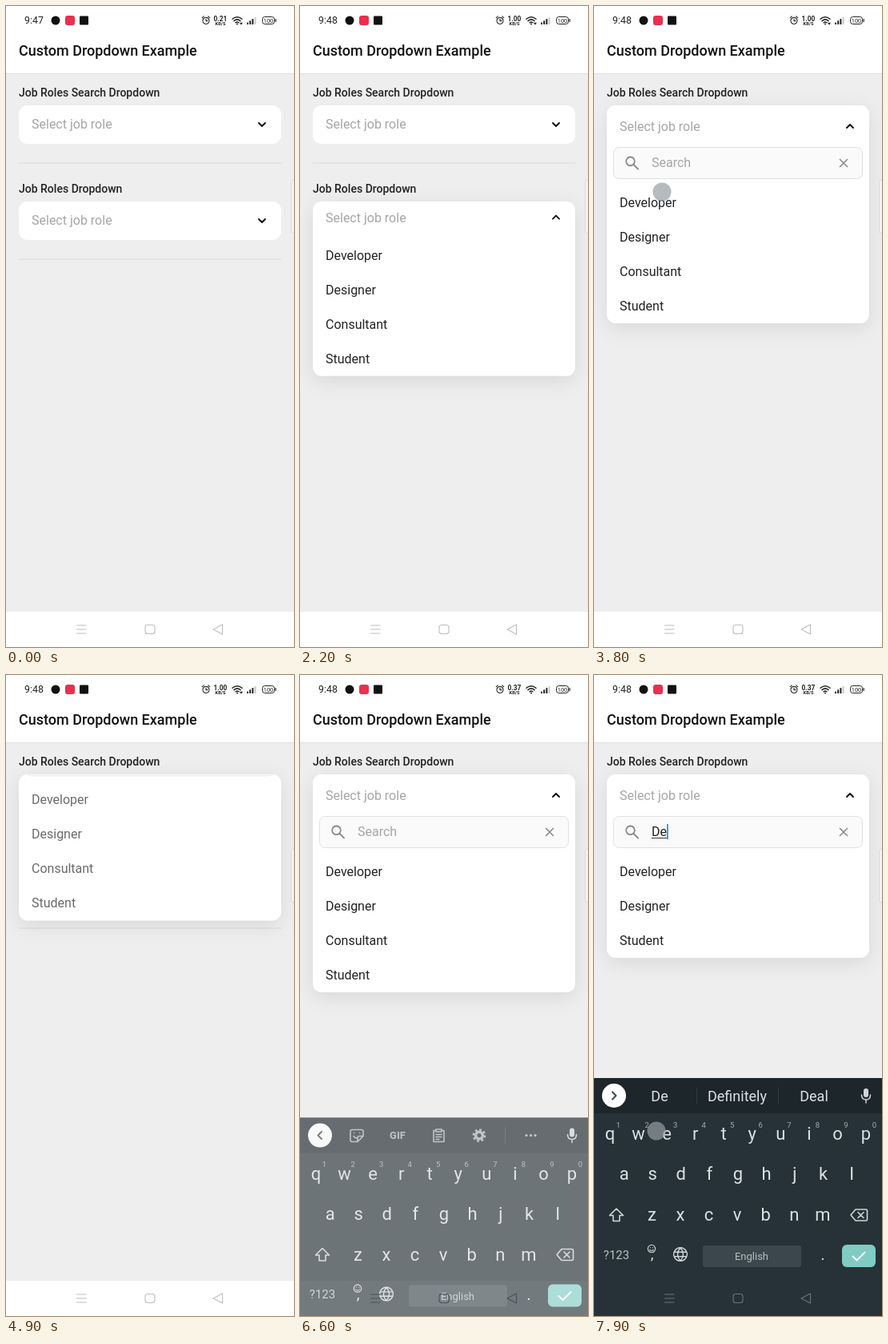
Write an HTML page that moves like this. It is 360x800 px and loops after 8 s.

```html
<!DOCTYPE html>
<html lang="en">
<head>
<meta charset="utf-8">
<title>Dropdown demo</title>
<style>
  html, body { margin: 0; width: 100%; height: 100%; overflow: hidden; background: #eee; }
  svg { display: block; }
  text { font-family: Roboto, "Noto Sans", sans-serif; font-size: 16px; fill: #222; white-space: pre; }
  .medium { font-weight: 500; font-size: 14px; }
  .hint { fill: #a6a6a6; }
  .line { fill: none; stroke-linecap: round; stroke-linejoin: round; }
  .mid { text-anchor: middle; }
  .panel { fill: #fff; filter: drop-shadow(0 6px 12px rgba(0, 0, 0, .09)); }
  #keyboard text { fill: #dce2e4; }
  #keyboard .letter { font-size: 22px; }
  #keyboard .digit { font-size: 9.5px; fill: #a3adb1; }
  #keyboard .word { font-size: 18px; }
  #tools { stroke: #aab0b3; stroke-width: 1.6; }
</style>
</head>
<body>
<svg id="stage" width="360" height="800" viewBox="0 0 360 800"></svg>
<script>
const LOOP = 8000;
const ROLES = ["Developer", "Designer", "Consultant", "Student"];
const $ = id => document.getElementById(id);
const clamp = v => Math.min(1, Math.max(0, v));
const show = (id, on) => { $(id).style.display = on ? "" : "none"; };

const text = (x, y, s, cls = "", more = "") => `<text x="${x}" y="${y}" class="${cls}" ${more}>${s}</text>`;
const line = (d, color, width, more = "") =>
  `<path class="line" d="${d}" stroke="${color}" stroke-width="${width}" ${more}/>`;
const rect = (x, y, w, h, r, fill, more = "") =>
  `<rect x="${x}" y="${y}" width="${w}" height="${h}" rx="${r}" fill="${fill}" ${more}/>`;
const chevron = (x, y, dir) => line(`M${x - 4} ${y - 2 * dir}l4 ${4 * dir}l4 ${-4 * dir}`, "#111", 1.9);

const field = (y, label) => text(16, y - 11, label, "medium")
  + rect(16, y, 328, 48, 11, "#fff") + text(32, y + 29, "Select job role", "hint")
  + chevron(320, y + 24, 1) + rect(16, y + 71.3, 328, 1.4, 0, "#e0e0e0");

const statusBar = text(23, 22.3, "9:47", "", 'id="clock" style="font-size:12.4px"')
  + `<circle cx="62" cy="18" r="5.5" fill="#111"/>`
  + rect(74, 12, 12, 12, 3, "#e9304f") + rect(92, 12.5, 11, 11, 1, "#111")
  + line("M250 14.3a4.1 4.1 0 1 1-.01 0M250 16v2.6h2M245.3 14.6l2-1.8M254.7 14.6l-2-1.8", "#222", 1.1)
  + text(268, 18.6, "0.21", "mid", 'id="rate" style="font-size:8.4px;font-weight:700"')
  + text(268, 24.2, "KB/S", "mid", 'style="font-size:5.7px;font-weight:700"')
  + line("M283 16.3q6-5.2 12 0M285 18.6q4-3.4 8 0M287.1 20.8q1.9-1.6 3.8 0", "#222", 1.5)
  + `<circle cx="289" cy="22.6" r="1" fill="#222"/><path id="traffic" d="M292 20.8h4l-2 3z" fill="#222"/>`
  + [0, 1, 2, 3].map(i => rect(301 + i * 3.2, 20.5 - i * 2.2, 2, 2.5 + i * 2.2, .6, i < 3 ? "#222" : "#c8c8c8")).join("")
  + rect(320.5, 13.5, 15, 9, 3, "none", 'stroke="#222"') + rect(336.5, 16, 1.2, 4, .6, "#222")
  + text(328, 20.7, "100", "mid", 'style="font-size:7.4px"');

// An overlay panel; its content hangs from the lower edge while it unfolds.
const overlay = (id, y) => rect(16, y, 328, 0, 11, "#fff", `id="${id}Box" class="panel"`)
  + `<svg id="${id}View" x="16" y="${y}" width="328" height="0"><g id="${id}Body"></g></svg>`;

const rows = (list, height) =>
  list.map((s, i) => text(16, height - 16 - 43 * (list.length - 1 - i), s)).join("");

const plainBody = text(16, 27, "Select job role", "hint") + chevron(304, 21, -1) + rows(ROLES, 219);

const searchBody = typed => {
  const list = ROLES.filter(s => s.toLowerCase().includes(typed.toLowerCase()));
  return text(16, 31.5, "Select job role", "hint") + chevron(304, 26, -1)
    + rect(8.5, 52.5, 311, 39, 7, "#fafafa", 'stroke="#e0e0e0"')
    + line("M29.5 64.5a5.3 5.3 0 1 1-.01 0M33.5 74l5.5 5.5", "#8a8a8a", 1.8)
    + line("M291.5 67.5l9 9m0-9l-9 9", "#8a8a8a", 1.6)
    + (typed ? text(56, 77, typed) + rect(56, 79, typed.length > 1 ? 19 : 10.5, 1, 0, "#333")
             : text(56, 77, "Search", "hint"))
    + rows(list, 100 + 43 * list.length);
};

const STEP = 35.55;
const letters = (s, x, y) => [...s].map((c, i) => text(x + i * STEP, y, c, "letter mid", `data-key="${c}"`)).join("");

const tools = `<g id="tools" class="line">
    <path d="M79 526v-6q0-2-2-2h-12q-2 0-2 2v11q0 2 2 2h7l7-7h-5q-2 0-2 2v5M67.5 522h.1M74.5 522h.1M67 526q2 3 4 2"/>
    <path d="M170 519h-3v14h13v-14h-3M170 517.5h7v3h-7zM170 524h7M170 527h7M170 530h4"/>
    <circle cx="224" cy="525" r="4.4" stroke-width="3.6"/>
    <circle cx="224" cy="525" r="7.2" stroke-width="2.4" stroke-dasharray="2.8 2.85" stroke-linecap="butt"/>
    <path d="M256.500 515v20" stroke="#38434a" stroke-width="1"/>
    <path d="M283 525h.1M288.500 525h.1M294 525h.1" stroke-width="3.200"/></g>`
  + text(122, 529.5, "GIF", "mid", 'style="font-size:13px;font-weight:700;fill:#aab0b3"');

const keyboard = `<g id="keyboard">`
  + rect(0, 503, 360, 300, 0, "#263238") + rect(0, 503, 360, 44, 0, "#1d262b")
  + `<g id="toolRow">${tools}</g><g id="wordRow">`
  + [82, 179, 275].map(x => text(x, 532, "", "word mid")).join("")
  + line("M128.500 515v20M230.500 515v20", "#2f3a40", 1) + `</g>`
  + `<circle cx="25" cy="525" r="15" fill="#fff"/>`
  + line("M27 520.500l-4.500 4.500l4.500 4.500", "#37474f", 2, 'id="arrow"')
  + rect(337, 516, 6, 11, 3, "#cfd5d8") + line("M334.500 524q0 6 5.500 6t5.500-6M340 530v4", "#cfd5d8", 1.5)
  + letters("qwertyuiop", 20, 580) + letters("asdfghjkl", 37.7, 630) + letters("zxcvbnm", 72.5, 681)
  + [..."1234567890"].map((c, i) => text(30.5 + i * STEP, 564.5, c, "digit mid")).join("")
  + line("M28 666l-8.500 8.500h4.500v7h8v-7h4.500z", "#cfd5d8", 1.6)
  + line("M327 667h13q1.500 0 1.500 1.500v11q0 1.500-1.500 1.500h-13l-6-7zM330 670.500l7 7m0-7l-7 7", "#cfd5d8", 1.6)
  + text(28, 728.5, "?123", "mid", 'style="font-size:15px;fill:#b9c2c5"')
  + line("M72 711.300a4.700 4.700 0 1 1-.01 0M70.300 714.600h.1M73.700 714.600h.1M69.700 717.200q2.300 3 4.600 0", "#cfd5d8", 1.1)
  + text(72.5, 729, ",", "mid", 'style="font-size:19px"')
  + line("M108 714.700a8.300 8.300 0 1 1-.01 0q-7 8.300 0 16.600q7-8.300 0-16.600M100.500 720.300h15M100.500 725.700h15", "#cfd5d8", 1.4)
  + rect(136, 712, 123, 27, 3, "#3b474d")
  + text(197, 730, "English", "mid", 'style="font-size:13px;fill:#b5bec1"')
  + text(286, 730, ".", "mid", 'style="font-size:21px"')
  + rect(310, 711, 42, 28, 6, "#80cbc4") + line("M323.500 725.500l5 5l10-10", "#fff", 2)
  + `</g>`;

$("stage").innerHTML = rect(0, 0, 360, 800, 0, "#eee") + rect(0, 0, 360, 84, 0, "#fff")
  + rect(0, 84, 360, 1, 0, "#dfdfdf") + rect(0, 756, 360, 44, 0, "#fff")
  + statusBar + text(16, 62.3, "Custom Dropdown Example", "medium", 'style="font-size:18px;fill:#111"')
  + field(124, "Job Roles Search Dropdown") + field(244, "Job Roles Dropdown")
  + overlay("plain", 244) + overlay("search", 124)
  + rect(72, 186, 1.8, 19, 0, "#2196f3", 'id="cursor"')
  + rect(356.5, 217.5, 9, 66, 2, "#f2f2f2", 'stroke="#dadada"')
  + keyboard
  + line("M88.500 773h11.500M88.500 778h11.500M88.500 783h11.500M177 772.500h6q3 0 3 3v5q0 3-3 3h-6q-3 0-3-3v-5q0-3 3-3M259 778l11.500-6v12z", "#bbb", 1.1, 'id="nav"')
  + `<circle id="touch" r="11.500" fill="#969ea2" opacity=".7"/>`;

$("plainBody").innerHTML = plainBody;
const keys = [...document.querySelectorAll("[data-key]")];
const words = [...document.querySelectorAll(".word")];

// Cubic ease (.4, 0, .2, 1).
function ease(x) {
  let lo = 0, hi = 1;
  for (let i = 0; i < 24; i++) {
    const s = (lo + hi) / 2, r = 1 - s;
    if (1.2 * r * r * s + .6 * r * s * s + s * s * s < x) lo = s; else hi = s;
  }
  return lo * lo * (3 - 2 * lo);
}

// Unfolded share for a list of [open, close] times.
const unfolded = (t, spans) => Math.max(...spans.map(([open, close]) =>
  t <= open || t >= close + 200 ? 0 : ease(Math.min(clamp((t - open) / 200), clamp(1 - (t - close) / 200)))));

function setOverlay(id, full, share) {
  const h = full * share;
  show(id + "Box", share > 0);
  show(id + "View", share > 0);
  $(id + "Box").setAttribute("height", h);
  $(id + "View").setAttribute("height", h);
  $(id + "Body").setAttribute("transform", `translate(0 ${h - full})`);
  $(id + "Body").setAttribute("opacity", share);
}

// Piecewise linear navigation icon colour: [time, r, g, b].
const NAV = [[6500, 190, 190, 190], [6600, 72, 82, 87], [6800, 31, 42, 48], [7100, 106, 116, 121]];
function navColor(t) {
  if (t <= NAV[0][0]) return "rgb(190,190,190)";
  const i = NAV.findIndex(k => k[0] > t);
  if (i < 0) return `rgb(${NAV.at(-1).slice(1)})`;
  const a = NAV[i - 1], b = NAV[i], u = (t - a[0]) / (b[0] - a[0]);
  return `rgb(${[1, 2, 3].map(c => Math.round(a[c] + (b[c] - a[c]) * u))})`;
}

const TOUCHES = [[3100, 3300, 52, 147], [3800, 4000, 85, 232], [6100, 6300, 150, 203],
  [6900, 7000, 28, 674], [7400, 7500, 108, 632], [7800, LOOP, 78, 569]];

let lastTyped = null;
function draw(now) {
  const t = now % LOOP;
  $("clock").textContent = t < 100 ? "9:47" : "9:48";
  $("rate").textContent = t < 1400 ? "0.21" : t < 5300 ? "1.00" : "0.37";
  show("traffic", t < 800 || (t >= 2000 && t < 5800));

  const typed = t < 7500 ? "" : t < 7800 ? "D" : "De";
  if (typed !== lastTyped) {
    $("searchBody").innerHTML = searchBody(typed);
    const guess = typed === "De" ? ["De", "Definitely", "Deal"] : ["D", "Do", "Did"];
    words.forEach((w, i) => { w.textContent = guess[i]; });
    lastTyped = typed;
  }
  setOverlay("plain", 219, unfolded(t, [[760, 2180]]));
  setOverlay("search", typed ? 229 : 272, unfolded(t, [[3260, 4787], [5250, Infinity]]));
  show("cursor", t >= 6900);
  $("cursor").setAttribute("x", typed === "De" ? 91 : typed ? 82.5 : 72);

  const left = 1 - clamp((t - 6505) / 237);
  const rise = 1 - left * left;
  show("keyboard", rise > 0);
  $("keyboard").setAttribute("transform", `translate(0 ${140 * (1 - rise)})`);
  $("keyboard").setAttribute("opacity", rise);
  show("toolRow", !typed);
  show("wordRow", typed);
  $("arrow").setAttribute("transform", typed ? "translate(50 0) scale(-1 1)" : "");
  const shifted = t >= 7000 && t < 7400;
  keys.forEach(k => { k.textContent = shifted ? k.dataset.key.toUpperCase() : k.dataset.key; });
  $("nav").setAttribute("stroke", navColor(t));

  const touch = TOUCHES.find(([from, to]) => t >= from && t < to);
  show("touch", touch);
  if (touch) $("touch").setAttribute("transform", `translate(${touch[2]} ${touch[3]})`);
}

function tick() {
  draw(performance.now());
  requestAnimationFrame(tick);
}
tick();
</script>
</body>
</html>
```
